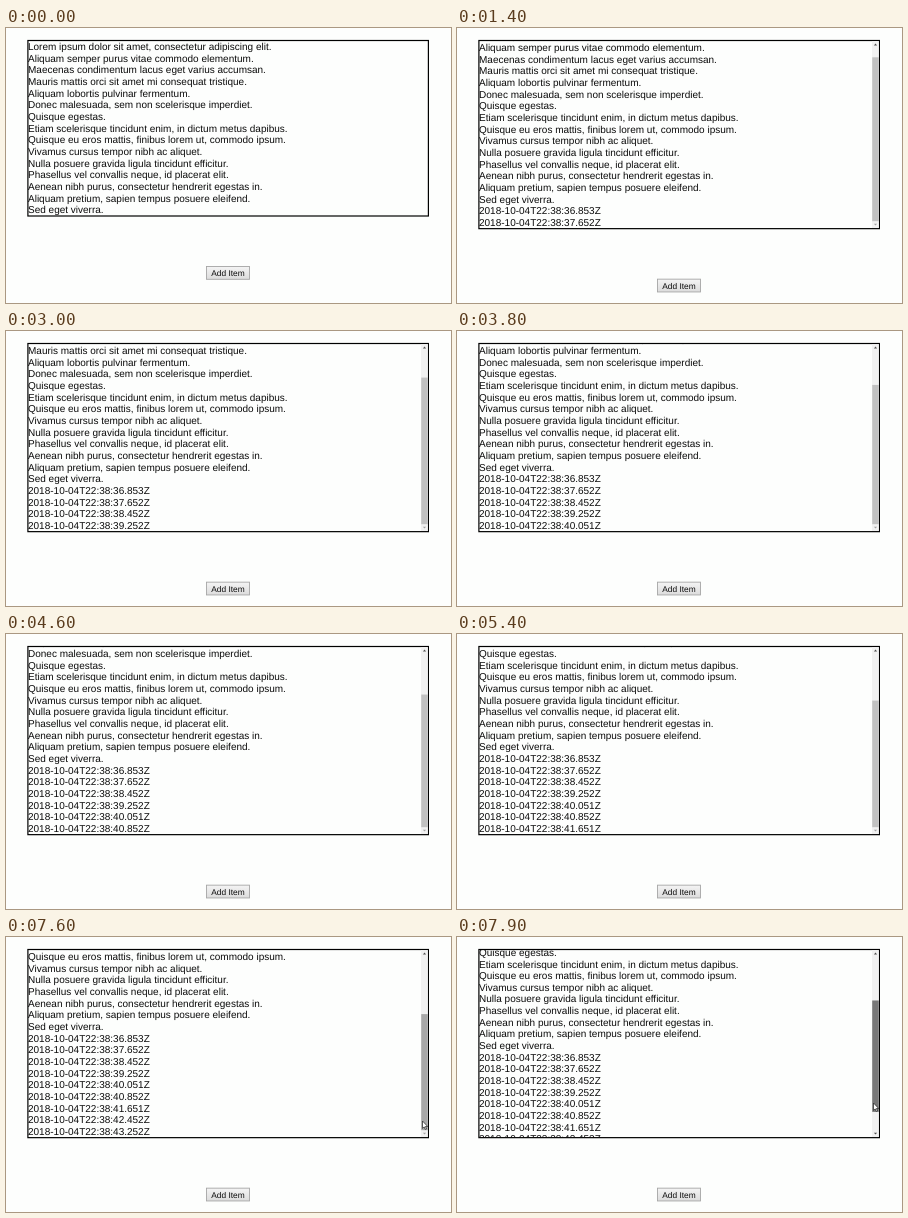
These frames come from a looping animation (445x275 px, 8000 ms). An HTML page:

```html
<!DOCTYPE html>
<html lang="en">
<head>
<meta charset="utf-8">
<title>Scrolling list</title>
<style>
  html, body { margin: 0; width: 100%; height: 100%; overflow: hidden; background: #fdfefd; }
  svg { display: block; width: 445px; height: 275px; }
  text { font: 10px "Liberation Sans", Arial, sans-serif; fill: #0c0c0c; text-rendering: geometricPrecision; }
  #button text { font-size: 8.35px; }
</style>
</head>
<body>
<svg viewBox="0 0 445 275">
  <defs>
    <clipPath id="view"><rect id="viewRect" x="21" y="12.9" width="401" height="187.4"/></clipPath>
    <linearGradient id="face" x2="0" y2="1">
      <stop stop-color="#f4f4f4"/>
      <stop offset="1" stop-color="#dcdcdc"/>
    </linearGradient>
  </defs>
  <rect id="frame" x="21.9" y="12.5" width="400.5" fill="none" stroke="#000" stroke-width="1.2"/>
  <g clip-path="url(#view)"><g id="list"></g></g>
  <g id="bar">
    <rect x="415" y="13.1" width="6.8" height="186.9" fill="#f1f1f1"/>
    <path d="M416.9 17.4h3.2l-1.6-1.8z" fill="#505050"/>
    <path id="down" d="M416.9 195.8h3.2l-1.6 1.8z"/>
    <rect id="thumb" x="415.2" width="6.6"/>
  </g>
  <g id="button">
    <rect x="200.5" y="238.5" width="43" height="12.8" fill="url(#face)" stroke="#a6a6a6" stroke-width=".9"/>
    <text x="222" y="247.9" text-anchor="middle">Add Item</text>
  </g>
  <path id="cursor" d="M0 0V7.4L1.7 5.9L2.8 8.5L4 8L2.9 5.5H5.2Z" fill="#fff" stroke="#222" stroke-width=".7"/>
</svg>
<script>
  const LOOP = 8000, TICK = 100;
  const TOP = 12.9, LINE = 11.65, MAX_HEIGHT = 187.4;
  const TRACK_TOP = 20, TRACK = 173.2;

  const sentences = `Lorem ipsum dolor sit amet, consectetur adipiscing elit.
Aliquam semper purus vitae commodo elementum.
Maecenas condimentum lacus eget varius accumsan.
Mauris mattis orci sit amet mi consequat tristique.
Aliquam lobortis pulvinar fermentum.
Donec malesuada, sem non scelerisque imperdiet.
Quisque egestas.
Etiam scelerisque tincidunt enim, in dictum metus dapibus.
Quisque eu eros mattis, finibus lorem ut, commodo ipsum.
Vivamus cursus tempor nibh ac aliquet.
Nulla posuere gravida ligula tincidunt efficitur.
Phasellus vel convallis neque, id placerat elit.
Aenean nibh purus, consectetur hendrerit egestas in.
Aliquam pretium, sapien tempus posuere eleifend.
Sed eget viverra.`.split("\n");

  const stamps = "36.853 37.652 38.452 39.252 40.051 40.852 41.651 42.452 43.252 44.052"
    .split(" ").map(s => `2018-10-04T22:38:${s}Z`);
  const addTimes = [600, 1400, 2200, 3000, 3800, 4600, 5400, 6200, 7100, 7800];

  // time, x, y of the pointer tip
  const pointer = [
    [6100, 437.5, 186], [7000, 431.7, 163.5], [7600, 416.5, 184],
    [7800, 416.5, 184], [7900, 416.5, 166]
  ];

  const el = id => document.getElementById(id);
  const set = (id, attrs) => {
    for (const key in attrs) el(id).setAttribute(key, attrs[key]);
  };

  const rows = [...sentences, ...stamps].map((content, i) => {
    const row = document.createElementNS("http://www.w3.org/2000/svg", "text");
    row.setAttribute("x", 22);
    row.setAttribute("y", TOP + i * LINE + 9.2);
    row.textContent = content;
    el("list").append(row);
    return row;
  });

  function pointerAt(t) {
    const next = pointer.findIndex(p => p[0] >= t);
    if (next < 1) return pointer[0].slice(1);
    const [t0, x0, y0] = pointer[next - 1], [t1, x1, y1] = pointer[next];
    const k = (t - t0) / (t1 - t0);
    return [x0 + (x1 - x0) * k, y0 + (y1 - y0) * k];
  }

  function draw(t) {
    const count = sentences.length + addTimes.filter(a => a <= t).length;
    const content = count * LINE;
    const height = Math.min(content, MAX_HEIGHT);
    const dragged = t >= 7900;
    const scroll = dragged ? 73.1 : content - height;

    rows.forEach((row, i) => row.setAttribute("visibility", i < count ? "visible" : "hidden"));
    set("list", { transform: `translate(0 ${-scroll})` });
    set("viewRect", { height });
    set("frame", { height: height + 0.75 });
    set("button", { transform: `translate(0 ${height - sentences.length * LINE})` });

    set("bar", { visibility: content > MAX_HEIGHT ? "visible" : "hidden" });
    set("thumb", {
      y: TRACK_TOP + scroll / content * TRACK,
      height: height / content * TRACK,
      fill: t >= 7800 ? "#787878" : t >= 7600 ? "#a8a8a8" : "#c1c1c1"
    });
    set("down", { fill: dragged ? "#505050" : "#a3a3a3" });

    const [x, y] = pointerAt(t);
    set("cursor", {
      visibility: t >= pointer[0][0] ? "visible" : "hidden",
      transform: `translate(${x} ${y})`
    });
  }

  const start = performance.now();
  function loop() {
    const t = (performance.now() - start) % LOOP;
    draw(Math.floor(t / TICK) * TICK);
    requestAnimationFrame(loop);
  }
  loop();
</script>
</body>
</html>
```
